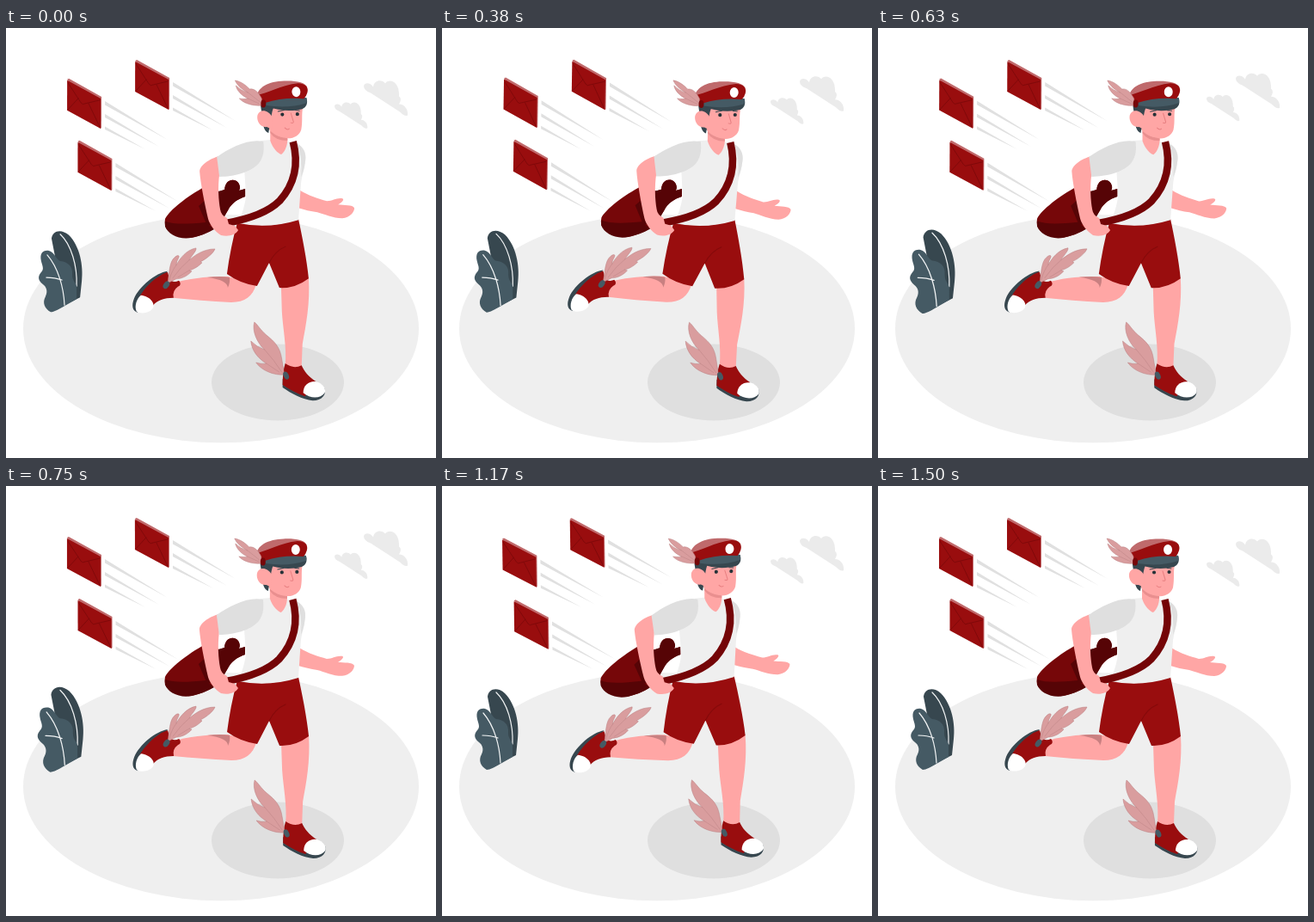
Write an HTML page that moves like this. It is 500x500 px and loops after 1540 ms.

```html
<!DOCTYPE html>
<html lang="en">
<head>
<meta charset="utf-8">
<title>Running courier</title>
<style>
  html, body { margin: 0; width: 100%; height: 100%; overflow: hidden; background: #fff; }
  svg { display: block; width: 100vw; height: 100vh; }
  .red { fill: #990d0e; }
  .maroon { fill: #760709; }
  .deep { fill: #560406; }
  .skin { fill: #ffa6a5; }
  .shirt { fill: #efefef; }
  .sleeve { fill: #dfdfdf; }
  .dark { fill: #37474f; }
  .slate { fill: #455a64; }
  .white { fill: #fff; }
  .wing { fill: #d99d9e; stroke: #b97c7e; stroke-width: .5; }
  .line { fill: none; stroke-linecap: round; stroke-linejoin: round; }
  .vein { stroke: #c58a8c; stroke-width: .7; }
  .rib { stroke: #f2f4f5; stroke-width: 1.2; }
  .strap { fill: none; stroke: #740507; stroke-width: 8.5; }
</style>
</head>
<body>
<svg viewBox="0 0 500 500">
  <defs>
    <g id="letter">
      <path fill="#c06a6c" d="M0 0 2-1 40 20V56L39 57Z"/>
      <path class="red" d="M0 1 39 22V57L0 36Z"/>
      <path class="line" stroke="#7a0809" stroke-width=".8" d="M1 4 16 27Q18 30 21 28L38 24M1 35 13 22M38 55 25 28"/>
      <path fill="#e0e0e0" d="M44 25V29.500L117 70ZM44 40V44L107 78ZM44 54.500V58L91 81Z"/>
    </g>
    <path id="cloud" fill="#ebebeb" d="M0 6C1 1 8 2 11 7C12-1 21-2 25 3C29-3 42 0 41 18C44 20 43 24 41 27C47 27 52 33 51 40Q48 42 42 36L8 14Q0 11 0 6Z"/>
  </defs>

  <ellipse cx="250" cy="349.500" rx="230" ry="132.700" fill="#efefef"/>
  <ellipse cx="316" cy="412" rx="77" ry="44.500" fill="#dfdfdf"/>

  <g id="clouds">
    <use href="#cloud" x="416" y="61.500"/>
    <use href="#cloud" transform="translate(382 86.500) scale(.75)"/>
  </g>

  <g id="plant">
    <path class="dark" d="M53 245C54 236 64 233 73 241C86 254 90 277 88 294L86 313 68 322Z"/>
    <path class="line rib" d="M63 240C76 252 83 277 82 300"/>
    <path class="slate" d="M68 323C61 327 56 330 52 330C45 326 42 319 46 312C49 306 47 301 43 298C37 293 37 289 41 284C45 280 42 276 41 271C39 262 43 258 50 259C57 261 58 269 63 271C72 272 78 277 77 287C77 296 83 296 82 304L82 315Z"/>
    <path class="line rib" d="M48 264C61 279 67 302 68 322M47 290Q57 290 65 293"/>
  </g>

  <g id="letters">
    <use href="#letter" x="71" y="60"/>
    <use href="#letter" x="150" y="38"/>
    <use href="#letter" x="83.500" y="132"/>
  </g>

  <g id="runner">
    <!-- bag -->
    <path class="maroon" d="M185 222C190 212 210 196 232 184L248 190 254 188C255 177 262 175 268 178C272 181 272 186 271 189L278 187V196C269 199 262 204 258 212L250 226Q240 238 220 243C208 247 190 240 185 231Q184 227 185 222Z"/>
    <path class="deep" d="M224 207 240 192 254 188C255 177 263 175 268 178C272 181 273 186 271 189L278 187V196C269 199 262 204 258 212L252 222 234 230ZM185 225C196 229 212 228 232 226L242 234Q230 241 216 244C202 247 188 240 185 231Z"/>

    <!-- far arm -->
    <path class="skin" d="M341 188C352 195 363 198 373 201C380 201 384 197 391 198C394 199 390 203 386 205C393 206 403 205 405 209C405 214 400 220 391 221C380 221 370 216 362 214C354 213 347 211 340 209Z"/>

    <!-- trailing leg -->
    <path class="skin" d="M201 295C220 290 240 289 258 289L291 298C287 312 278 319 262 319C238 318 215 316 194 314C190 307 194 299 201 295Z"/>
    <path fill="#c98081" d="M234 290Q250 288 260 290 261 296 258 302 258 293 234 290Z"/>
    <path class="dark" d="M188 283C174 285 155 301 149 315C146 323 147 329 153 331L168 310Z"/>
    <path class="red" d="M188 284 190 291C192 296 197 296 201 294C204 297 203 300 200 301Q193 306 195 314C184 314 176 317 171 323L154 316C158 306 168 296 175 291Q181 286 188 284Z"/>
    <path class="white" d="M157 311C167 312 174 320 171 326C167 332 157 333 152 330C149 324 152 315 157 311Z"/>
    <path class="wing" d="M188 297C190 285 190 272 196 267C199 264 202 264 201 267Q198 272 198 276C202 268 210 258 221 256C222 259 215 266 213 270C220 264 230 257 243 257C241 262 234 268 226 272L228 273C222 279 217 281 213 282L216 283C210 290 202 292 198 292Z"/>
    <path class="line vein" d="M190 293Q193 282 198 276M194 291Q203 278 213 270M200 290 213 282"/>
    <ellipse class="slate" cx="186.500" cy="299" rx="3.200" ry="4.800" transform="rotate(35 186.500 299)"/>

    <!-- leading leg -->
    <path class="skin" d="M320 300 352 290C354 320 349 345 345 367L344 394Q334 399 325 392C327 372 322 348 321 330Z"/>
    <path class="dark" d="M322 408C334 418 345 424 356 426L371 419C373 426 368 433 357 433C345 432 332 425 322 418Z"/>
    <path class="red" d="M325 390Q335 397 344 392C347 399 352 405 361 411L348 428C338 425 330 420 322 415Q322 399 325 390Z"/>
    <path class="white" d="M346 424C346 415 353 410 361 411C369 413 373 420 371 424C366 431 354 431 346 424Z"/>
    <path class="wing" d="M324 403C313 404 298 399 291 389Q297 391 303 390C293 384 286 375 285 364Q292 371 301 374C292 366 286 352 289 342C293 345 296 351 303 357C313 365 319 371 321 385Z"/>
    <path class="line vein" d="M321 400Q312 386 301 374M318 400 303 390"/>
    <ellipse class="slate" cx="326" cy="404" rx="3" ry="4.800" transform="rotate(-25 326 404)"/>

    <!-- shorts -->
    <path class="red" d="M269 226Q305 234 340 222C344 240 350 270 352 291Q336 303 318 302L306 273 292 300Q272 297 257 286 261 255 269 226Z"/>
    <path class="line" stroke="#840a0b" d="M325 254Q313 259 306 273"/>

    <!-- neck and shirt -->
    <path class="shirt" d="M296 131 308 130 327 132 338 134C346 138 349 145 348 153C347 163 344 172 343 179L340 223Q305 234 270 227C275 215 278 205 279 195L277 165Z"/>
    <path class="sleeve" d="M338 134C346 138 349 146 348 153C347 163 345 169 343 173Q345 150 338 134Z"/>
    <path class="skin" d="M307 115V131C310 140 316 146 320 147C325 143 328 135 327 124Z"/>
    <path fill="#e98f8f" d="M307 119Q316 128 327 127V131Q313 131 307 122Z"/>
    <path class="strap" d="M333.500 132C341 160 335 182 318 201Q300 219 256 227"/>

    <!-- near arm -->
    <path class="skin" d="M248 149C236 152 225 160 225 167C226 180 231 205 235 222C237 229 243 237 250 241C258 243 267 241 270 235L266 230 259 228 257 221Q250 218 249 211C247 200 246 185 248 170Z"/>
    <path class="sleeve" d="M299 132C283 128 260 139 245 150L248 173C264 173 285 168 294 157C300 149 300 140 299 132Z"/>

    <!-- head -->
    <path class="skin" d="M306 91 345 92C343 100 345 108 343 118C341 125 333 129 326 128C317 127 309 123 305 117Z"/>
    <path class="dark" d="M295 83 312 90C309 96 309 99 308 104L305 122C302 121 299 117 299 112L296 92Z"/>
    <path class="skin" d="M309 103C304 94 294 94 292 102C291 109 296 116 303 115L309 118Z"/>
    <g fill="#263238"><circle cx="321" cy="100.500" r="2.100"/><circle cx="338.500" cy="100" r="2.100"/></g>
    <path class="line" stroke="#e77f80" d="M331 99 334 109Q334 111 331 110M324 116Q327 119 329 117"/>
    <path class="line" stroke="#37474f" d="M316 97 323 95.500M336 95.500 341 96"/>

    <!-- cap -->
    <path class="dark" d="M299 84Q326 77 349 81C351 87 349 92 344 94C333 97 318 97 303 91Z"/>
    <path class="slate" d="M299 84Q326 77 349 81 350 84 349 87 328 94 302 90Z"/>
    <path fill="#bf6a6c" d="M291 82C291 69 305 62 323 61.500C337 61 348 63 350 69L330 78 296 84Z"/>
    <path class="red" d="M291 78C303 76 320 66 339 64C348 64 352 69 350 75Q349 79 346 82 322 80 301 87L293 83Z"/>
    <ellipse class="white" cx="337" cy="74" rx="5" ry="6"/>
    <path class="wing" d="M297 90C288 91 276 88 271 82Q277 83 281 82C274 79 268 73 267 67Q273 73 281 75C273 71 268 66 266 61C273 62 279 67 283 71C288 70 293 74 297 82Z"/>
    <path class="line vein" d="M294 88 281 82M295 86 281 75"/>
    <ellipse class="maroon" cx="299" cy="88" rx="3" ry="4.500"/>
  </g>
</svg>
<script>
  const LOOP = 1540, LEAD = 45;
  const move = (id, value) => document.getElementById(id).setAttribute('transform', value);

  // 0 -> 1 -> -1 -> 0 at constant speed, in degrees
  const sway = p => p < .25 ? 4 * p : p < .75 ? 2 - 4 * p : 4 * p - 4;
  // two soft beats, then a rest
  const beat = p => p < 2 / 3 ? Math.sin(3 * Math.PI * p) ** 2 : 0;

  function draw(now) {
    const p = ((now + LEAD) % LOOP) / LOOP;
    const scale = 1 + .06 * beat(p);
    move('runner', `rotate(${sway(p)} 276 247)`);
    move('letters', `rotate(${sway(p)} 168 126)`);
    move('clouds', `translate(0 ${-4.5 * (1 - Math.cos(2 * Math.PI * p))})`);
    move('plant', `translate(63 283) scale(${scale}) translate(-63 -283)`);
  }

  const start = performance.now();
  function tick() {
    draw(performance.now() - start);
    requestAnimationFrame(tick);
  }
  tick();
</script>
</body>
</html>
```
